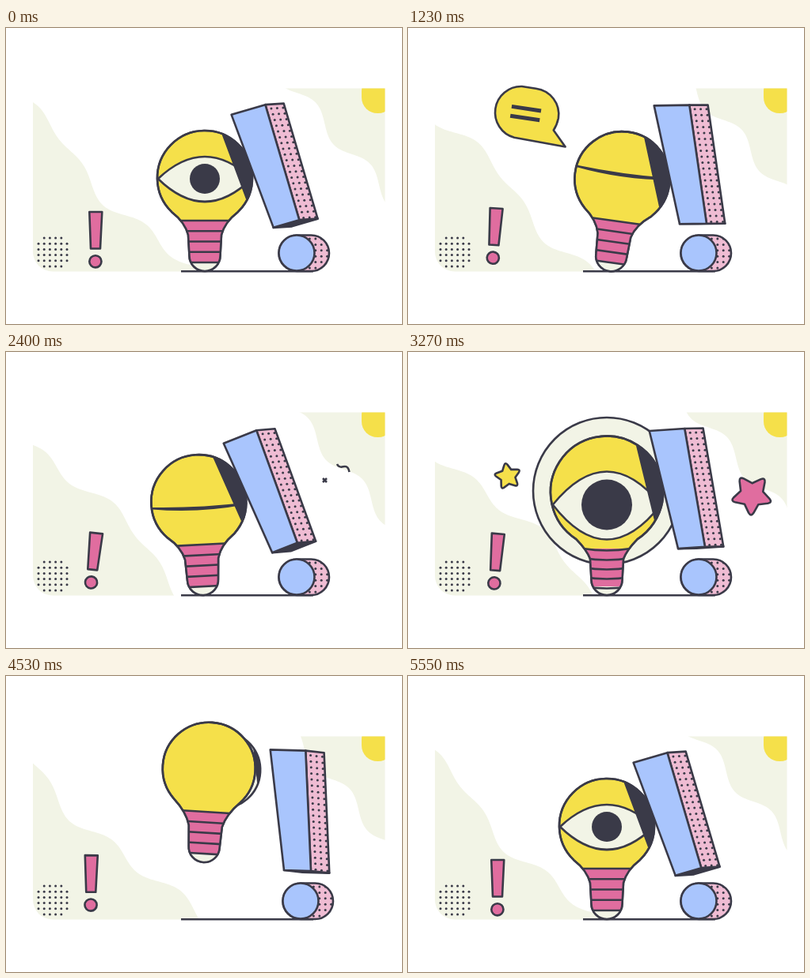
Write an HTML page with a canvas that moves like this. It is 500 px wide and 375 px high and loops after 5.58 s.

```html
<!DOCTYPE html>
<html lang="en">
<head>
<meta charset="utf-8">
<title>Bulb and exclamation mark</title>
<style>
html, body { margin: 0; width: 100%; height: 100%; overflow: hidden; background: #fff; }
canvas { display: block; width: 500px; height: 375px; }
</style>
</head>
<body>
<canvas id="stage" width="500" height="375"></canvas>
<script>
const g = document.getElementById('stage').getContext('2d');
const LOOP = 5580, TAU = 2 * Math.PI, RAD = Math.PI / 180;
const { sin, cos, sqrt, abs, max } = Math;
const INK = '#3a3a48', YELLOW = '#f5e04a', PINK = '#e06d9f', ROSE = '#efbcd3', BLUE = '#a9c5fd', CREAM = '#f2f4e6';

const clamp = (v, lo = 0, hi = 1) => Math.min(hi, max(lo, v));
const mix = (a, b, u) => a + (b - a) * u;
const ramp = (t, a, b) => { const u = clamp((t - a) / (b - a)); return u * u * (3 - 2 * u); };
// Rises from a to b, falls from c to d
const pulse = (t, a, b, c, d) => ramp(t, a, b) - ramp(t, c, d);

// Strength of each act at time t; every pose is a rest pose plus these
function acts(t) {
  const turn = clamp((t - 3810) / 1440);
  return {
    push: pulse(t, 0, 1200, 1250, 2350),
    recoil: pulse(t, 1250, 2350, 2420, 2800),
    shut: pulse(t, 950, 1180, 2500, 2800),
    zoom: pulse(t, 2700, 3180, 3300, 3600),
    jump: pulse(t, 3700, 4080, 4600, 5160),
    knock: pulse(t, 3650, 4150, 4850, 5300),
    bubble: pulse(t, 150, 600, 1380, 1600) + .06 * pulse(t, 400, 600, 600, 850),
    spark: pulse(t, 2180, 2380, 2500, 2750),
    star: pulse(t, 2780, 3180, 3320, 3600),
    dash: pulse(t, 3780, 3950, 4060, 4220),
    spin: turn * TAU,
    bulge: 16 * clamp(3 * sin(TAU * turn ** 1.3), -1, 1)
  };
}

function paint(path, fill, line = 2.6) {
  if (fill) { g.fillStyle = fill; g.fill(path); }
  if (line) { g.strokeStyle = INK; g.lineWidth = line; g.stroke(path); }
}
function poly(...pts) {
  const p = new Path2D();
  pts.forEach(([x, y]) => p.lineTo(x, y));
  p.closePath();
  return p;
}
function disc(x, y, r) {
  const p = new Path2D();
  p.arc(x, y, r, 0, TAU);
  return p;
}
function local(draw, x = 0, y = 0, turn = 0, scale = 1) {
  g.save();
  g.translate(x, y);
  g.rotate(turn * RAD);
  g.scale(scale, scale);
  draw();
  g.restore();
}
const dot = (x, y) => paint(disc(x, y, 1.5), INK, 0);

// Both hills are waves travelling along a diagonal
function background(t) {
  const area = new Path2D(), sun = new Path2D(), left = [[0, 400]], right = [[520, 40]];
  for (let s = 90; s <= 760; s += 3) {
    const a = TAU * ((s - 60) / 440 - t / LOOP), b = TAU * ((s - 560) / 146 - 2 * t / LOOP + .5);
    const d = 84 - .02 * s + 15 * cos(a + 1.91) + 5 * cos(2 * a - .75) + 8.7 * cos(3 * a + .13);
    const q = 312.6 - .06 * s + 13 * cos(b);
    if (s < 600) left.push([(s - d) / 2, (s + d) / 2]);
    if (s > 400) right.push([(s + q) / 2, (s - q) / 2]);
  }
  g.save();
  area.roundRect(34, 76.5, 444.5, 232, [0, 0, 0, 25]);
  g.clip(area);
  paint(poly(...left), CREAM, 0);
  paint(poly(...right), CREAM, 0);
  sun.roundRect(449, 60, 41, 48, 20);
  paint(sun, YELLOW, 0);
  g.restore();
  for (let i = 0; i < 6; i++)
    for (let j = 0; j < 6; j++)
      if (i % 5 || j % 5) dot(41 + 7.2 * i, 266 + 7.2 * j);
}

function smallMark(t) {
  const bob = 6 * sin(1.5 * TAU * t / LOOP) ** 2;
  local(() => {
    paint(poly([-8, -46.5], [8, -46.5], [6, 0], [-6, 0]), PINK);
    paint(disc(0, 16.3, 7.6), PINK);
  }, 113 - bob, 279.5 - bob, 3 + 3 * cos(TAU * (t / LOOP - .42)));
}

function bulbShape(cy, r, neck) {
  const p = new Path2D(), a = (104 - r) * RAD;
  p.arc(0, -cy, r, TAU / 4 + a, TAU * 1.25 - a);
  p.quadraticCurveTo(25, 2 - neck, 21, -46);
  p.arc(0, -19.5, 19.5, 0, Math.PI);
  p.lineTo(-21, -46);
  p.quadraticCurveTo(-25, 2 - neck, -r * sin(a), r * cos(a) - cy);
  p.closePath();
  return p;
}

function eye(k, r) {
  const y = 1 - 9 * k.push + 4 * k.recoil + 15 * k.zoom;
  const up = mix(-28 - 14 * k.zoom - 17 * k.jump, 2, k.shut);
  const down = mix(29 + 15 * k.zoom + 13 * k.jump, 4, k.shut);
  const pupil = 19 + 13 * k.zoom + 5 * k.jump;
  const half = sqrt(r * r - y * y) - 1, side = sin(k.spin), front = cos(k.spin);
  // The near corner follows the turn, the far one goes round the rim
  const x1 = side < 0 ? 40 * side - half : -half * front;
  const x2 = side < 0 ? half * front : half + 40 * side;
  if (x2 < 3 - half || x1 > half - 3) return;
  const mid = (x1 + x2) / 2, lid = new Path2D();
  lid.moveTo(x1, y);
  lid.quadraticCurveTo(mid, y + 2 * up, x2, y);
  lid.quadraticCurveTo(mid, y + 2 * down, x1, y);
  paint(lid, CREAM, 0);
  if (front > 0) {
    const iris = new Path2D();
    iris.ellipse(55 * side, y + 5 * abs(side), pupil * (.6 + .4 * front), pupil, 0, 0, TAU);
    g.save();
    g.clip(lid);
    paint(iris, INK, 0);
    g.restore();
  }
  paint(lid);
}

function base(neck, sag) {
  const rings = new Path2D();
  g.fillStyle = PINK;
  g.fillRect(-40, -neck, 80, neck - 11);
  g.fillStyle = CREAM;
  g.fillRect(-40, -11, 80, 12);
  for (let i = 0; i < 5; i++) {
    const y = mix(-neck, -11, i / 4);
    rings.moveTo(-30, y);
    rings.quadraticCurveTo(0, y + sag, 30, y);
  }
  paint(rings);
}

function bulb(k, m) {
  const cy = 118 + 12.5 * k.zoom + k.jump, r = 60 + 11 * k.zoom - 1.5 * k.jump, neck = 64 - 5 * k.zoom;
  const body = bulbShape(cy, r, neck), ball = disc(k.bulge, 1 - cy, 49), head = disc(0, -cy, r);
  head.addPath(ball);
  if (k.zoom > .01) paint(disc(251, 176, 93 * k.zoom), CREAM);
  local(() => {
    paint(ball, CREAM);
    paint(body, YELLOW);
    g.save();
    g.clip(body);
    base(neck, 5 * k.zoom);
    g.restore();
    g.save();
    g.clip(head);
    local(() => eye(k, r), 0, -cy);
    // Shade runs parallel to the leaning mark
    g.setTransform(1, 0, 0, 1, 0, 0);
    const edge = y => m.tl[0] - 20 + (m.bl[0] - m.tl[0]) * (y - m.tl[1]) / (m.bl[1] - m.tl[1]);
    paint(poly([edge(0), 0], [500, 0], [500, 320], [edge(320), 320]), INK);
    g.restore();
    paint(body);
  }, 251 + 3 * k.push - 1.5 * k.recoil - 2 * k.jump, 308 - 72 * k.jump, 8 * k.push - 3 * k.recoil + 3.5 * k.jump);

  if (k.dash > .02)
    for (let i = -1; i < 2; i++) {
      const y = i ? 262 : 266;
      paint(poly([248.5 + 14 * i, y], [248.5 + 14 * i, y + (i ? 23 : 30) * k.dash]));
    }
}

function markPose({ push, recoil, zoom, knock }) {
  const tilt = (-16.5 + 15.5 * push - 5 * recoil + 12.8 * zoom + 18 * knock) * RAD;
  const at = (x, y, w) => [x + w * cos(tilt), y + w * sin(tilt)];
  const top = w => at(306 + 27 * push - 10.5 * recoil + 21 * zoom + 50 * knock,
    103.5 - 5.5 * push + 4 * recoil - 5 * zoom - 9.5 * knock, w);
  const foot = w => at(354 + 6 * push - 2 * recoil + 4 * zoom + 14 * knock, 248 - 1.5 * knock, w);
  return {
    tl: top(-22.3), tr: top(22.3), bl: foot(-17), br: foot(17),
    slope: -1.5 + 1.5 * push - .5 * recoil + zoom + 4.2 * knock,
    dotX: 367 + 5 * knock
  };
}

function bigMark({ tl, tr, bl, br, slope, dotX }) {
  const deep = ([x, y], u = 1) => [x + 23.3 * u, y + slope * u];
  const side = poly(tr, deep(tr), deep(br), br), pill = new Path2D();
  paint(poly(bl, br, deep(br), deep(bl)), INK);
  paint(side, ROSE, 0);
  g.save();
  g.clip(side);
  for (let j = .7; j < 20; j++)
    for (let i = 0; i < 3; i++)
      dot(...deep([mix(tr[0], br[0], j / 20), mix(tr[1], br[1], j / 20)], .26 + .32 * i));
  g.restore();
  paint(side);
  paint(poly(tl, tr, br, bl), BLUE);

  pill.roundRect(dotX - 22.5, 262.5, 63.5, 45.5, 22.7);
  paint(pill, ROSE, 0);
  g.save();
  g.clip(pill);
  for (let j = 0; j < 6; j++)
    for (let i = 0; i < 5; i++) dot(dotX + 9 + 7.4 * i, 267 + 7.4 * j);
  g.restore();
  paint(pill);
  paint(disc(dotX, 285, 22.5), BLUE);
}

function bubble(size) {
  if (size < .02) return;
  local(() => local(() => {
    paint(new Path2D('M-9-32H9A33 33 0 0 1 42.5 1Q42 10 38.7 17L56.5 35.5L-9 33.5A33 33 0 0 1-9-32Z'), YELLOW);
    paint(new Path2D('M-18-5H19.5M-18 7H19.5'), null, 5);
  }, -51, -43, 8.5), 199, 150, 0, size);
}

function star(x, y, r, turn, size, fill) {
  if (size < .02) return;
  local(() => {
    const p = new Path2D(), pt = (i, rad) => [rad * cos(i * TAU / 10), rad * sin(i * TAU / 10)];
    for (let i = 0; i < 10; i += 2) {
      p.lineTo(...pt(i - .22, r * .9));
      p.quadraticCurveTo(...pt(i, r * 1.1), ...pt(i + .22, r * .9));
      p.lineTo(...pt(i + 1, r * .58));
    }
    p.closePath();
    paint(p, fill);
  }, x, y, turn, size);
}

function extras(k) {
  const spin = 60 * (1 - k.star);
  star(126, 157.5, 16.5, -100 - spin, k.star, YELLOW);
  star(434, 181, 25.5, -124 + spin, k.star, PINK);
  if (k.spark < .02) return;
  local(() => paint(new Path2D('M-8-5C-5 1-1-2 2-2C6-2 7 2 7.5 5')), 426, 147, 0, k.spark);
  local(() => paint(new Path2D('M-2.5-2.5L2.5 2.5M2.5-2.5L-2.5 2.5')), 402.5, 162.5, 0, k.spark);
}

function frame(now) {
  const t = Math.floor(now % LOOP / 30) * 30, k = acts(t), m = markPose(k);
  g.fillStyle = '#fff';
  g.fillRect(0, 0, 500, 375);
  g.lineJoin = 'round';
  background(t);
  smallMark(t);
  paint(new Path2D('M221 308.3H388'));
  bulb(k, m);
  bigMark(m);
  bubble(k.bubble);
  extras(k);
}

const start = performance.now();
function tick() {
  frame(performance.now() - start);
  requestAnimationFrame(tick);
}
tick();
</script>
</body>
</html>
```
